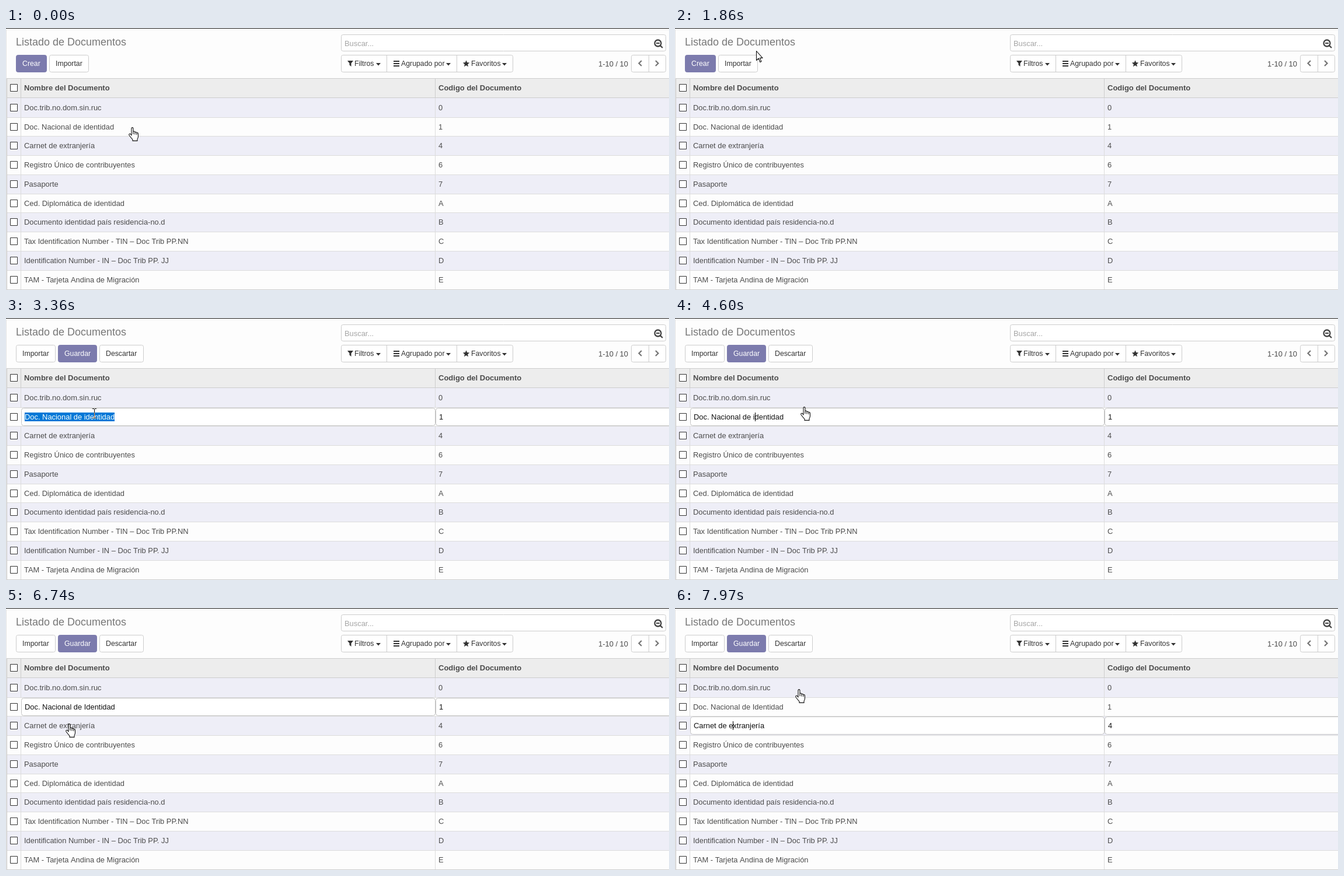
An HTML page with a canvas for the animation above (8 s loop, 1136 by 449 pixels).

```html
<!DOCTYPE html>
<html lang="es">
<head>
<meta charset="utf-8">
<title>Listado de Documentos</title>
<style>
html, body { margin: 0; width: 100%; height: 100%; overflow: hidden; background: #fdfdfd; }
canvas { display: block; }
</style>
</head>
<body>
<canvas id="stage" width="1136" height="449"></canvas>
<script>
const ctx = document.getElementById('stage').getContext('2d');
const LOOP = 8000, STEP = 120;
const FONT = '"Liberation Sans", Arial, sans-serif';
const BODY = '12.9px ' + FONT, BOLD = 'bold 13px ' + FONT, SMALL = '12.3px ' + FONT;
const INK = '#4c4c4c', LINE = '#cccccc', PAPER = '#fdfdfd', VIOLET = '#7c7bad';

const docs = [
  ['Doc.trib.no.dom.sin.ruc', '0'],
  ['Doc. Nacional de identidad', '1'],
  ['Carnet de extranjería', '4'],
  ['Registro Único de contribuyentes', '6'],
  ['Pasaporte', '7'],
  ['Ced. Diplomática de identidad', 'A'],
  ['Documento identidad país residencia-no.d', 'B'],
  ['Tax Identification Number - TIN – Doc Trib PP.NN', 'C'],
  ['Identification Number - IN – Doc Trib PP. JJ', 'D'],
  ['TAM - Tarjeta Andina de Migración', 'E']
];

// Screen updates come in bursts: [start, number of steps]
const bursts = [[120, 2], [390, 7], [1260, 7], [2100, 2], [2370, 7], [3210, 1], [3360, 5],
  [4090, 2], [4360, 3], [4970, 2], [5460, 2], [5980, 1], [6230, 2], [6500, 5], [7230, 3], [7970, 1]];
const ticks = [0, ...bursts.flatMap(([t, n]) => Array.from({ length: n }, (_, i) => t + i * STEP))];

// Pointer path: time, hot spot, shape from that time on
const path = [
  [0, 215, 170, 'hand'], [120, 223, 80, 'arrow'], [240, 165, 22, 'arrow'], [390, 100, 30, 'arrow'],
  [630, 37, 40, 'arrow'], [870, 222, 35, 'arrow'], [1110, 190, 46, 'arrow'], [1380, 226, 64, 'arrow'],
  [1620, 150, 66, 'arrow'], [1860, 139, 39, 'arrow'], [1980, 74, 46, 'arrow'], [2100, 130, 90, 'hand'],
  [2220, 169, 134, 'hand'], [2370, 200, 160, 'hand'], [2490, 214, 202, 'hand'], [2850, 142, 196, 'hand'],
  [3090, 138, 167, 'hand'], [3210, 149, 162, 'hand'], [3360, 151, 163, 'beam'], [3840, 192, 168, 'beam'],
  [4090, 140, 168, 'beam'], [4210, 141, 169, 'beam'], [4480, 200, 166, 'beam'], [4600, 220, 152, 'hand'],
  [5980, 220, 152, 'hand'], [6350, 153, 191, 'hand'], [6740, 107, 198, 'hand'], [6860, 100, 203, 'beam'],
  [7230, 101, 203, 'beam'], [7350, 165, 165, 'hand'], [7470, 211, 139, 'hand'], [7970, 211, 139, 'hand']
];
const caretOn = [[4090, 4970], [5090, 5460], [5580, 5980], [7230, 7470], [7970, LOOP]];
const selected = [[3360, 4090], [6860, 7230]];

const arrow = new Path2D('M.5.5V16.5L4.2 13 6.8 19.5 9 18.5 6.4 12.4H11Z');
const hand = new Path2D('M5 14V2.5Q5 .6 6.5 .6T8 2.5V8Q8.4 6.8 9.7 7T11 9Q11.5 8 12.7 8.3T14 10' +
  'Q14.5 9.2 15.5 9.6T16.5 11.5V16Q16.5 18 15 20.5V23.4H7V21.2Q4 18 1 13.8 .2 12.2 1.4 11.4 2.8 10.8 4 12.4Z' +
  'M8 8V12M11 9V12.5M14 10V13');

const within = (t, spans) => spans.some(([a, b]) => t >= a && t < b);
const rowTop = i => Math.floor(120.35 + 32.77 * i);

function rect(x, y, w, h, color) {
  ctx.fillStyle = color;
  ctx.fillRect(x, y, w, h);
}
function text(str, x, y, font = BODY, color = INK) {
  ctx.font = font;
  ctx.fillStyle = color;
  ctx.fillText(str, x, y);
}
function box(x, y, w, h, fill = '#ffffff', border = LINE, r = 3) {
  ctx.beginPath();
  ctx.roundRect(x + .5, y + .5, w - 1, h - 1, r);
  ctx.fillStyle = fill;
  ctx.fill();
  ctx.strokeStyle = border;
  ctx.lineWidth = 1;
  ctx.stroke();
}
function poly(points, color) {
  ctx.beginPath();
  points.forEach(([x, y]) => ctx.lineTo(x, y));
  ctx.fillStyle = color;
  ctx.fill();
}
function stroke(d, width, color) {
  ctx.strokeStyle = color;
  ctx.lineWidth = width;
  ctx.stroke(new Path2D(d));
}
function button(label, x, w, primary) {
  box(x, 46, w, 30, primary ? VIOLET : '#ffffff', primary ? VIOLET : LINE);
  text(label, x + 11, 65, SMALL, primary ? '#ffffff' : '#333333');
}
const checkbox = y => box(7, y, 13, 13, '#ffffff', '#333333', 0);
const dropCaret = x => poly([[x, 60], [x + 8, 60], [x + 4, 64.5]], '#333333');

function toolbar(editing) {
  text('Listado de Documentos', 17, 30, '18px ' + FONT, '#777777');
  if (editing) {
    button('Importar', 17, 68);
    button('Guardar', 89, 67, true);
    button('Descartar', 160, 76);
  } else {
    button('Crear', 17, 53, true);
    button('Importar', 74, 68);
  }

  box(574, 11, 557, 29);
  text('Buscar...', 580, 31, BODY, '#a5a5a5');
  stroke('M1122.5 26A5.5 5.5 0 1 1 1111.5 26A5.5 5.5 0 1 1 1122.5 26M1121 30L1125 34', 2.3, '#444444');
  rect(1114, 25, 6, 2, '#444444');

  box(574, 46, 295, 30);
  rect(652, 46, 1, 30, LINE);
  rect(772, 46, 1, 30, LINE);
  poly([[585, 56], [595, 56], [591.5, 60.5], [591.5, 66], [588.5, 63.5], [588.5, 60.5]], '#333333');
  for (let i = 0; i < 3; i++) rect(664, 56 + 4 * i, 10, 2, '#333333');
  poly(Array.from({ length: 10 }, (_, i) => {
    const a = i * Math.PI / 5, r = i % 2 ? 2.7 : 6;
    return [788.5 + r * Math.sin(a), 61.3 - r * Math.cos(a)];
  }), '#333333');
  text('Filtros', 597, 65, SMALL, '#333333');
  text('Agrupado por', 677, 65, SMALL, '#333333');
  text('Favoritos', 797, 65, SMALL, '#333333');
  [634, 754, 850].forEach(dropCaret);

  text('1-10 / 10', 1015, 66);
  box(1071, 46, 60, 30);
  rect(1101, 46, 1, 30, LINE);
  stroke('M1089 56L1084.5 60.5 1089 65M1113 56L1117.5 60.5 1113 65', 2.3, '#777777');
}

function editRow(i, name, t) {
  const y = rowTop(i), base = y + 21;
  box(26, y + 1, 710, 31, '#ffffff', '#c4c4c4', 4);
  box(736, y + 1, 410, 31, '#ffffff', '#c4c4c4', 4);
  text(docs[i][1], 742, base, BODY, '#111111');
  const marked = within(t, selected);
  ctx.font = BODY;
  if (marked) rect(32, y + 9, Math.round(ctx.measureText(name).width), 15, '#0078d7');
  text(name, 32, base, BODY, marked ? '#ffffff' : '#111111');
  if (within(t, caretOn)) {
    const head = i === 2 ? 'Carnet de e' : 'Doc. Nacional de ' + (t < 5090 ? 'i' : t < 5580 ? '' : 'I');
    rect(Math.round(32 + ctx.measureText(head).width), y + 9, 1, 15, '#000000');
  }
}

function table(t, editing) {
  rect(1, 86, 1135, 34, '#ededed');
  rect(1, 86, 1135, 1, LINE);
  checkbox(96);
  text('Nombre del Documento', 31, 107, BOLD);
  text('Codigo del Documento', 741, 107, BOLD);
  docs.forEach(([name, code], i) => {
    const y = rowTop(i);
    rect(1, y, 1135, rowTop(i + 1) - y, i % 2 ? PAPER : '#eeeef7');
    if (i) rect(1, y, 1135, 1, '#dcdcdc');
    checkbox(y + 10);
    if (i === 1 && t >= 5090)
      name = 'Doc. Nacional de ' + (t < 5580 ? '' : 'I') + 'dentidad';
    if (i === editing) editRow(i, name, t);
    else {
      text(name, 31, y + 21);
      text(code, 741, y + 21);
    }
  });
  rect(1, 119, 1135, 1, LINE);
  rect(1, 448, 1135, 1, LINE);
  rect(1, 86, 1, 363, LINE);
  for (const x of [25, 735]) {
    rect(x, 87, 1, 33, LINE);
    docs.forEach((_, i) => i !== editing && rect(x, rowTop(i), 1, 33, '#dcdcdc'));
  }
}

function pointer(t) {
  const k = path.findLastIndex(p => p[0] <= t);
  const a = path[k], b = path[k + 1] || a;
  const f = b === a ? 0 : (t - a[0]) / (b[0] - a[0]);
  const x = Math.round(a[1] + (b[1] - a[1]) * f);
  const y = Math.round(a[2] + (b[2] - a[2]) * f);
  ctx.save();
  if (a[3] === 'beam') {
    ctx.globalCompositeOperation = 'difference';
    ctx.translate(x, y);
    rect(0, -7, 1, 15, '#ffffff');
    for (const end of [-8, 8]) {
      rect(-3, end, 3, 1, '#ffffff');
      rect(1, end, 3, 1, '#ffffff');
    }
  } else {
    const shape = a[3] === 'hand' ? hand : arrow;
    ctx.translate(shape === hand ? x - 5 : x, y);
    ctx.fillStyle = '#ffffff';
    ctx.fill(shape);
    ctx.strokeStyle = '#111111';
    ctx.lineWidth = 1.1;
    ctx.lineJoin = 'round';
    ctx.stroke(shape);
  }
  ctx.restore();
}

function draw(now) {
  const t = ticks.findLast(s => s <= now % LOOP);
  const editing = t < 3360 ? -1 : t < 6860 ? 1 : 2;
  rect(0, 0, 1136, 449, PAPER);
  rect(0, 0, 1136, 1, '#1a1a1a');
  rect(0, 1, 1, 448, '#e4e4e4');
  toolbar(editing >= 0);
  table(t, editing);
  pointer(t);
}

const start = performance.now();
function loop() {
  draw(performance.now() - start);
  requestAnimationFrame(loop);
}
loop();
</script>
</body>
</html>
```
